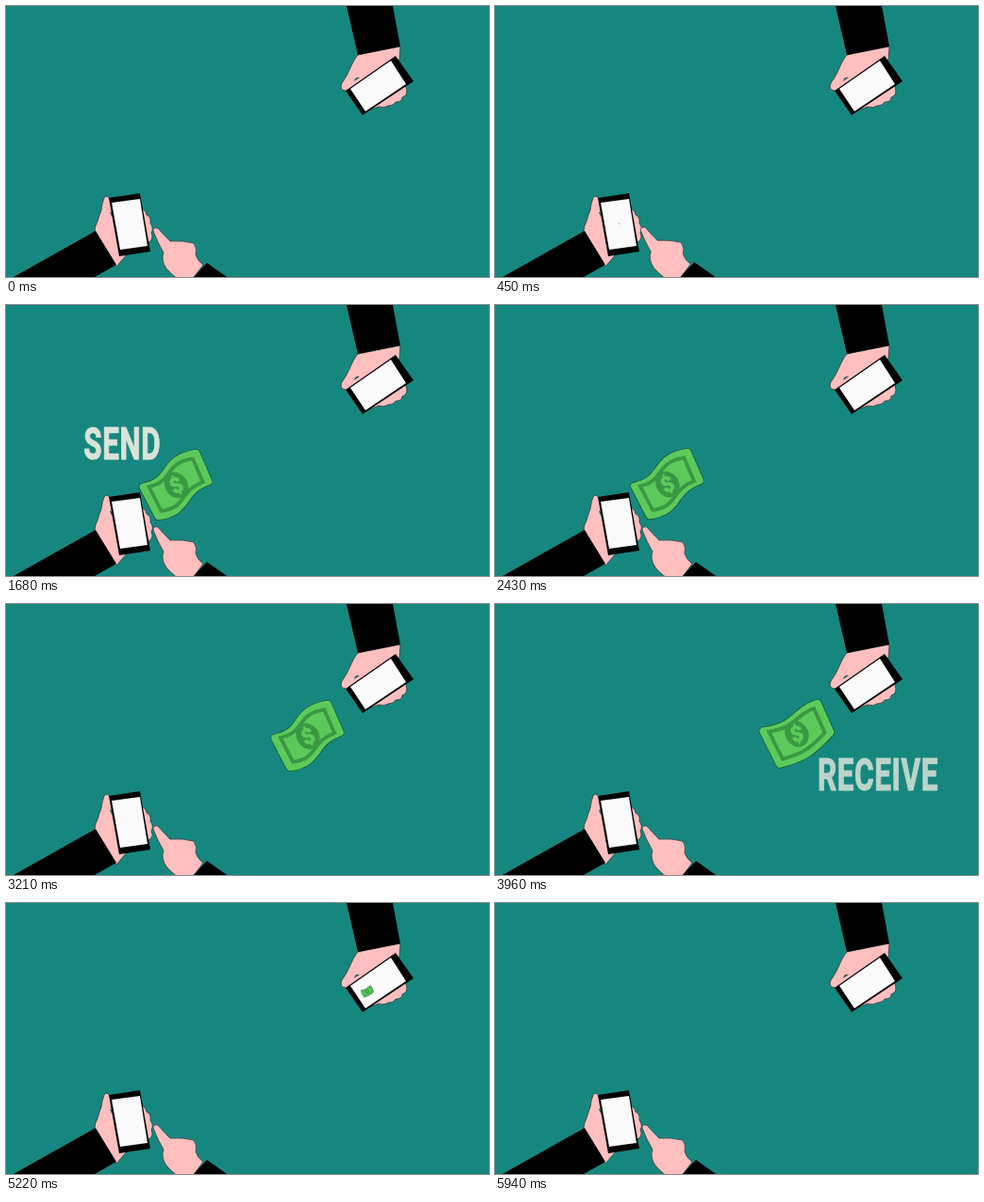
These frames come from a looping animation (512x288 px, 5.97 s). An HTML page:

```html
<!DOCTYPE html>
<html lang="en">
<head>
<meta charset="utf-8">
<title>Send and receive</title>
<style>
  html, body { margin: 0; width: 100%; height: 100%; overflow: hidden; background: #16877f; }
  svg { display: block; width: 100%; height: 100%; }
  .skin { fill: #ffbfbf; stroke: #26302f; stroke-width: .7; stroke-linejoin: round; }
  .screen { fill: #fafafa; }
  .gap { fill: #1d5f5b; }
  .word { font: bold 48px Roboto, sans-serif; letter-spacing: 1px; text-anchor: middle; fill: #dae3d8; stroke: #dae3d8; stroke-width: 1.2; }
  .edge { fill: none; stroke: #1c5a3a; stroke-width: 9.2; stroke-linejoin: round; }
  .paper { fill: #5cca5a; stroke: #5cca5a; stroke-width: 7.6; stroke-linejoin: round; }
  .frame { fill: none; stroke: #3a9844; stroke-width: 4.6; }
  .seal { fill: #3a9844; }
  .dollar { font: 900 23px Roboto, sans-serif; text-anchor: middle; fill: #5cca5a; stroke: #5cca5a; stroke-width: .6; }
</style>
</head>
<body>
<svg viewBox="0 0 512 288">
  <g id="sender">
    <path class="skin" d="M94 240Q94 234 97 229Q99 222 101 217Q102 209 104 204Q107 200 110 205L140 215Q148 215 149 222Q154 224 153 231Q157 236 154 241Q157 248 151 251L128 264L117 277Z"/>
    <path d="M8 288L95 239L117 275L94 288Z"/>
    <path d="M109 204L142 199L153 261L120 266Z"/>
    <path class="screen" d="M112 209L142 205L150 255L121 259Z"/>
    <path class="gap" d="M110 219q3 -1 2 5z"/>
  </g>
  <g id="receiver">
    <path class="skin" d="M373 52C366 60 365 70 356 82Q353 89 360 90L382 112L395 107Q401 109 405 106Q411 106 413 102Q420 102 420 97Q427 95 424 86L412 60L417 57L418 43Z"/>
    <path d="M361 0H410L418 43L373 52Z"/>
    <path d="M413 53L432 80L378 116L360 90Z"/>
    <path class="screen" d="M408 58L424 83L381 112L365 88Z"/>
    <path class="gap" d="M369 80q1 -5 6 -4z"/>
  </g>
  <g id="pointer">
    <path class="skin" d="M156 239Q156 235 161 236Q166 242 174 250Q187 249 199 252Q203 258 201 264Q203 271 209 275L198 290H182Q175 285 170 279Q164 270 167 262Q161 252 156 239Z"/>
    <path d="M197 290L213 273L237 290Z"/>
  </g>
  <g id="bill">
    <path class="edge wave"/>
    <path class="paper wave"/>
    <path class="frame wave" transform="scale(.83)"/>
    <ellipse class="seal" rx="12" ry="14.5" transform="rotate(-30)"/>
    <g id="sign"><text class="dollar" y="8">$</text></g>
  </g>
  <text class="word" id="send" transform="translate(123.3 164) scale(.655 1)">SEND</text>
  <text class="word" id="receive" transform="translate(406 198) scale(.655 1)">RECEIVE</text>
</svg>
<script>
const LOOP = 5970;
const el = id => document.getElementById(id);
const waves = document.querySelectorAll('.wave');

// Outline points of the bill at the two ends of its ripple
const rippleA = [-35, 2, -2, -5, -17, -28, 21, -34, 34, -4, 3, 7, 15, 28, -19, 33];
const rippleB = [-36, -4, 2, -9, 0, -24, 22, -32, 36, -1, 19, 22, 6, 25, -18, 32];

const mix = (a, b, k) => a + (b - a) * k;
const ease = (t, from, to) => {
  const k = Math.min(1, Math.max(0, (t - from) / (to - from)));
  return k * k * (3 - 2 * k);
};

function billPath(k) {
  const p = rippleA.map((a, i) => mix(a, rippleB[i], k).toFixed(2));
  return `M${p.slice(0, 2)}C${p.slice(2, 8)}L${p.slice(8, 10)}C${p.slice(10)}Z`;
}

function draw(t) {
  const tap = ease(t, 90, 270) - ease(t, 300, 510);
  el('pointer').setAttribute('transform', `translate(${-9 * tap} ${-4 * tap})`);

  const out = ease(t, 420, 840);
  const travel = ease(t, 2370, 3150);
  const ripple = ease(t, 3630, 4080);
  const into = ease(t, 4890, 5340);
  const x = mix(mix(131, 180.5, out) + 139.5 * travel, 396, into);
  const y = mix(mix(232, 191.5, out) - 51 * travel - 3 * ripple, 85, into);
  const size = out * (1 - into);
  el('bill').setAttribute('transform', `translate(${x} ${y}) scale(${size})`);
  el('bill').style.display = size > 0 ? '' : 'none';

  const d = billPath(ripple);
  waves.forEach(path => path.setAttribute('d', d));
  el('sign').setAttribute('transform', `rotate(${mix(-27, -16, ripple)})`);

  el('send').style.opacity = ease(t, 600, 900) - ease(t, 2100, 2370);
  el('receive').style.opacity = ease(t, 3690, 4050) - ease(t, 4890, 5220);
}

function tick() {
  draw(performance.now() % LOOP);
  requestAnimationFrame(tick);
}
tick();
</script>
</body>
</html>
```
